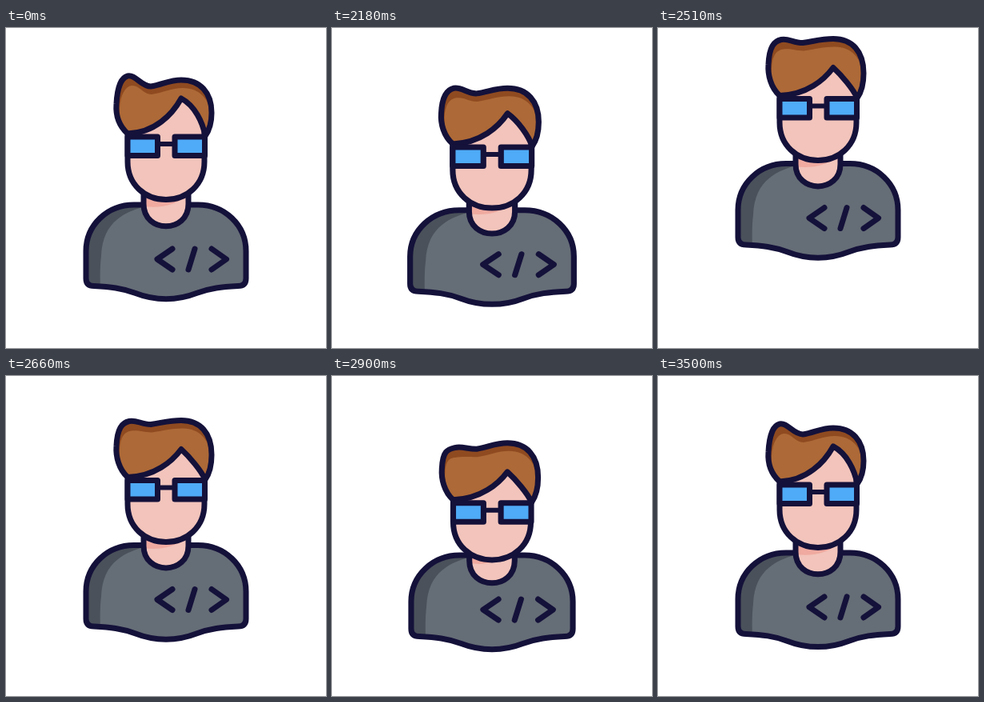
An HTML page that plays this animation: 400 by 400 pixels, repeating every 3.56 s.

```html
<!DOCTYPE html>
<html lang="en">
<head>
<meta charset="utf-8">
<title>Developer jump</title>
<style>
html, body { margin: 0; width: 100%; height: 100%; overflow: hidden; background: #fff; }
svg { display: block; width: 100vw; height: 100vh; }
.line { stroke: #14113a; stroke-width: 7; stroke-linecap: round; stroke-linejoin: round; }
</style>
</head>
<body>
<svg viewBox="0 0 400 400">
  <defs>
    <path id="torso" d="M100 279C100 246 127 221 160 221H240C273 221 300 246 300 279V313Q300 322.5 290 322.5C270 323.5 255 325 238 331.5C214 341 186 341 162 331.5C145 325 130 323.5 110 322.5Q100 322.5 100 313Z"/>
    <clipPath id="inTorso"><use href="#torso"/></clipPath>
  </defs>
  <g id="figure">
    <use href="#torso" fill="#656d76"/>
    <path clip-path="url(#inTorso)" fill="#4a515a" d="M176 222C150 230 121 240 119 285Q117 300 118 330H90V210H176Z"/>
    <use href="#torso" class="line" fill="none"/>
    <path class="line" fill="none" stroke-width="6.5" d="M208 276L189 289L208 302M236 276L228 302M257 276L275.5 289L257 302"/>
    <g id="neck">
      <path fill="#f2c4bb" d="M172 195V220C172 257 228 257 228 220V195Z"/>
      <path fill="#f0aaa0" d="M172 195V223Q203 227 224 211V195Z"/>
      <path class="line" fill="none" d="M172 203V220C172 257 228 257 228 220V203"/>
    </g>
    <path id="face" class="line" fill="#f2c4bb" d="M152 84V167C152 196 174 214.5 200 214.5S248 196 248 167V84"/>
    <path id="hairDark" fill="#8f4a20"/>
    <path id="hairLight" fill="#ad6937"/>
    <path id="hairLine" class="line" fill="none"/>
    <g id="glasses" class="line" fill="#4fabf7">
      <path d="M190 145H211" style="stroke-width:6"/>
      <rect x="152" y="136" width="37.5" height="23.5"/>
      <rect x="211" y="136" width="37.5" height="23.5"/>
    </g>
  </g>
</svg>
<script>
const LOOP = 3560, START = 2030, END = 3500, STEP = 30;
const CROUCH = 2000, JUMP = 2246, LAND = 2680, REST = 3080;
const el = id => document.getElementById(id);

const span = (t, a, b) => Math.min(1, Math.max(0, (t - a) / (b - a)));
const ease = u => u * u * (3 - 2 * u);
const bump = (t, a, b) => Math.sin(Math.PI * span(t, a, b));

// Crouch, ballistic flight, then a damped bounce
function bodyY(t) {
  if (t < JUMP) return 9 * bump(t, CROUCH, JUMP);
  if (t < LAND) {
    const u = span(t, JUMP, LAND);
    return -54 * 4 * u * (1 - u);
  }
  const s = t - LAND;
  return 14 * Math.exp(-0.0042 * s) * Math.sin(Math.PI * s / 270);
}

function hairPath(h, e, n, inset) {
  const top = y => y + h;
  const low = y => y + e;
  const mid = y => y + (h + e) / 2;
  const tip = 60 + 6 * n + 0.3 * h, dip = 73 - 3 * n + 0.15 * h;
  const peak = top(88 + 13 * n);
  const outer = `C141 ${low(122)} 137 ${mid(108)} 138 ${mid(95)}`
    + `C139 ${top(75)} ${144 + n} ${top(tip + 2)} ${152 + 2 * n} ${top(tip)}`
    + `C${162 + n} ${top(tip - 2)} 169 ${top(dip)} 181 ${top(dip)}`
    + `C195 ${top(dip - 2)} 204 ${top(65)} 219 ${top(65)}`
    + `C243 ${top(65)} 257 ${top(81)} 257 ${mid(106)}`;
  const inner = `C143 ${low(122)} 141 ${mid(108)} 142 ${mid(100)}`
    + `C143 ${top(84)} 149 ${top(tip + 13)} 157 ${top(tip + 12)}`
    + `C167 ${top(tip + 11)} 171 ${top(dip + 10)} 182 ${top(dip + 10)}`
    + `C196 ${top(dip + 8)} 207 ${top(75)} 221 ${top(75)}`
    + `C243 ${top(75)} 253 ${top(90)} 257 ${mid(106)}`;
  return `M152 ${low(132)}${inset ? inner : outer}`
    + `C257 ${mid(119)} 254 ${low(128)} 249 ${low(135)}`
    + `C${246 - 2 * n} ${low(118 + 6 * n)} ${236 - 6 * n} ${peak + 9 + n} 219 ${peak}`
    + `C208 ${peak + 20 - 5 * n} 186 ${low(131)} 152 ${low(132)}Z`;
}

const shift = (id, y) => el(id).setAttribute("transform", `translate(0 ${y})`);

function draw(ms) {
  const t = ms < START ? 0 : Math.min(END, START + STEP * Math.floor((ms - START) / STEP));
  const y = bodyY(t);
  const wide = 1 + 0.0035 * Math.max(0, y);
  const nod = ease(span(t, START, 2280)) * (1 - ease(span(t, 2900, REST)));
  const sink = 0.3 * bump(t, CROUCH, JUMP) + bump(t, LAND, REST);
  const hair = 16 * sink, eyes = 4 * nod + 16 * sink, chin = 2.5 * nod + 10 * sink;

  el("figure").setAttribute("transform", `translate(200 ${y}) scale(${wide} 1) translate(-200 0)`);
  shift("neck", chin * 0.65);
  shift("face", chin);
  shift("glasses", eyes);
  const outline = hairPath(hair, eyes, nod, false);
  el("hairDark").setAttribute("d", outline);
  el("hairLine").setAttribute("d", outline);
  el("hairLight").setAttribute("d", hairPath(hair, eyes, nod, true));
}

const begin = performance.now();
function tick() {
  draw((performance.now() - begin) % LOOP);
  requestAnimationFrame(tick);
}
tick();
</script>
</body>
</html>
```
